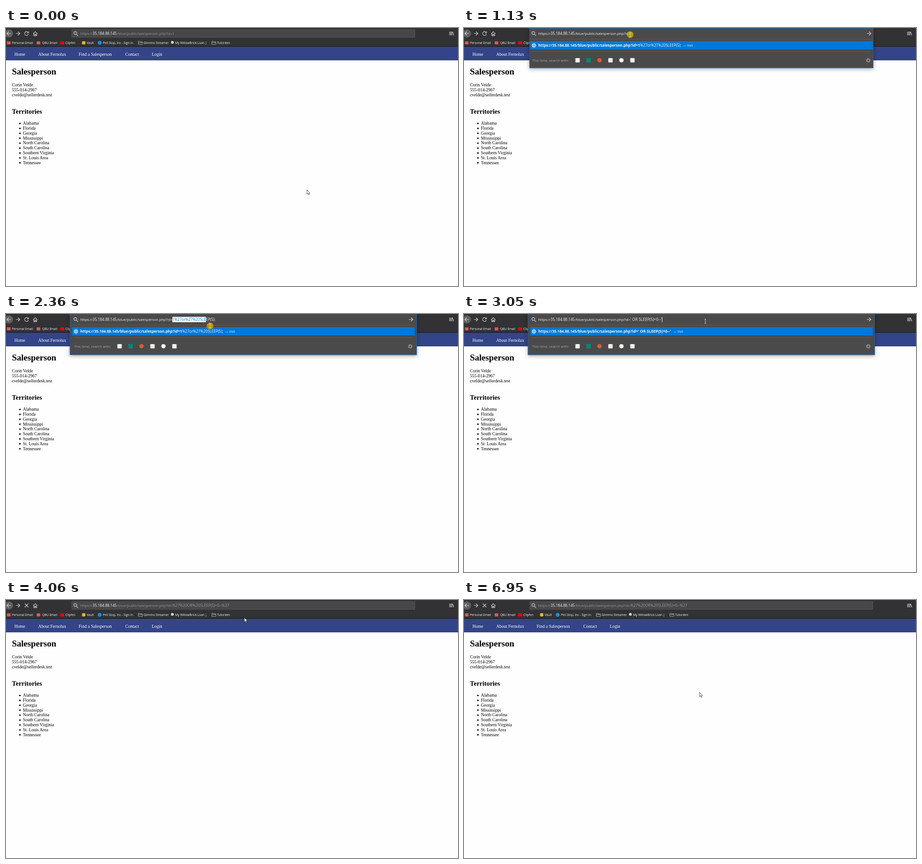
Animation of 989 by 566 pixels, one loop 8.11 s. Source, as an HTML page:

```html
<!DOCTYPE html>
<html lang="en">
<head>
<meta charset="utf-8">
<title>Salesperson</title>
<style>
html, body { margin: 0; height: 100%; overflow: hidden; background: #fefefe; }
svg { display: block; width: 989px; height: 566px; font: 9.6px "Liberation Serif", "Times New Roman", serif; }
text { white-space: pre; }
.ui { font-family: "Open Sans", "Noto Sans", sans-serif; fill: #f4f4f5; }
.line { fill: none; stroke: #d2d2d4; stroke-width: 1.2; }
.thin { fill: none; stroke: #c4c4c6; stroke-width: .8; }
.nav { fill: #fff; }
.b { font-weight: bold; }
#panel { fill: #4a4a4b; stroke: #1d6cb8; stroke-width: .9; filter: drop-shadow(0 2px 4px rgba(0, 0, 0, .35)); }
</style>
</head>
<body>
<svg viewBox="0 0 989 566">
  <defs>
    <g id="globe" class="thin">
      <circle r="4.3"/><ellipse rx="2" ry="4.3"/><path d="M-4.3 0H4.3M-3.7 -2.2H3.7M-3.7 2.2H3.7"/>
    </g>
    <path id="folder" class="thin" d="M.5 7.2V.5H3.8L4.8 1.7H9.3V7.2ZM.5 3H9.3"/>
    <path id="go" class="line" d="M-4.5 0H4M.3 -4L4.3 0L.3 4"/>
  </defs>

  <rect width="989" height="41" fill="#323234"/>
  <rect y="40" width="989" height="1.2" fill="#161618"/>
  <circle cx="6.5" cy="12" r="9" fill="#5f5f61"/>
  <use href="#go" transform="translate(6.3 12) scale(-1 1)"/>
  <use href="#go" x="26" y="12"/>
  <path id="reload" class="line" d="M48 9.2A4.2 4.2 0 1 0 49.1 13M49.2 7.4V10.6H46"/>
  <path id="stop" class="line" d="M41 8L49 16M49 8L41 16"/>
  <path class="line" d="M59.3 12.6L64 8L68.7 12.6M60.9 11.8V16.8H63V13.8H65V16.8H67.1V11.8"/>
  <path class="line" d="M970.8 8V16M973.3 8V16M975.8 8V16M977 8.2L979.8 16"/>
  <rect x="143.9" y="3.4" width="750.8" height="17.2" fill="#474749" stroke="#5c5c5e" stroke-width=".8"/>
  <g id="marks" class="ui" font-size="6.7"></g>

  <rect y="41" width="989" height="30" fill="#334488"/>
  <g id="page"></g>

  <g id="drop">
    <rect id="panel"/>
    <path stroke="#5e5e60" stroke-width=".8" d="M143.5 24.5H895"/>
    <rect x="144.5" y="29" width="750" height="18" fill="#0078d7"/>
    <use href="#globe" x="153" y="38.3" style="filter:brightness(1.3)"/>
    <text class="ui b" font-size="8.1" x="162.5" y="41.2">https://35.184.88.145/blue/public/salesperson.php?id=<tspan id="hit"></tspan></text>
    <text id="visit" class="ui" font-size="6.7" y="41">— Visit</text>
    <g id="second">
      <use href="#globe" x="153" y="60"/>
      <text class="ui" font-size="7.7" x="162.5" y="63" style="fill:#e2e2e4">Salesperson: Corin Velde</text>
      <text class="ui" font-size="6.8" y="62.6" style="fill:#6cb9f4"><tspan x="259.5" fill="#c0c0c2">— </tspan><tspan x="270.5">35.184.88.145/blue/public/salesperson.php?id=</tspan><tspan class="b">' OR SLEEP(5)=0--'</tspan></text>
    </g>
    <g id="engines">
      <path stroke="#5e5e60" stroke-width=".8" d="M149 51.5H890"/>
      <text class="ui" font-size="7.8" x="149" y="74" style="fill:#a4a4a6">This time, search with:</text>
      <g class="thin"><circle cx="884.5" cy="71" r="2.6"/><circle cx="884.5" cy="71" r="4" stroke-width="1.4" stroke-dasharray="1.57"/></g>
    </g>
    <use href="#go" x="886" y="12"/>
  </g>

  <g class="line"><circle cx="151.6" cy="11" r="3.1"/><path d="M153.9 13.4L157.5 17"/></g>
  <rect id="sel" x="364" y="6.3" height="11.7" fill="#fff"/>
  <text id="url" class="ui" y="15.4"><tspan class="dim" x="162.5" font-size="7.9">https://</tspan><tspan x="189.5" font-size="8.1">35.184.88.145</tspan><tspan class="dim" x="243" font-size="7.8">/blue/public/salesperson.php?id=</tspan><tspan id="picked" x="364" fill="#0078d7"></tspan><tspan id="tail" class="dim"></tspan></text>
  <rect id="caret" x="433" y="6.3" width="1" height="11.7" fill="#f4f4f5"/>

  <g id="mouse">
    <circle id="press" r="7.3" fill="#c8b000" opacity=".82"/>
    <path id="beam" fill="none" stroke="#d8d8da" stroke-width=".9" d="M-1.8 -4.6H1.8M0 -4.6V4.6M-1.8 4.6H1.8"/>
    <path id="arrow" fill="#fff" stroke="#222" stroke-width=".8" d="M0 0V9.6L2.2 7.6L3.8 11.1L5.3 10.4L3.7 7.1H6.6Z"/>
  </g>
</svg>
<script>
const LOOP = 8110;
const $ = id => document.getElementById(id);
const add = (id, markup) => $(id).insertAdjacentHTML('beforeend', markup);
const show = (id, on) => $(id).style.display = on ? '' : 'none';
const set = (id, attrs) => { for (const k in attrs) $(id).setAttribute(k, attrs[k]); };
const label = (x, y, s, extra = '') => `<text x="${x}" y="${y}" ${extra}>${s}</text>`;
const box = (x, y, w, h, fill) => `<rect x="${x}" y="${y}" width="${w}" height="${h}" rx="1" fill="${fill}"/>`;
const dot = (x, y, r, fill) => `<circle cx="${x}" cy="${y}" r="${r}" fill="${fill}"/>`;

// Bookmarks
[[13, 'Personal Email'], [79, 'QBU Email'], [130, 'Clipfen'], [176.5, 'Vault'], [212, 'Pell Stop, Inc - Sign In'],
 [301, 'Glimmo Streamer'], [370, 'My WillowBrick Loan |'], [462, 'Tutorden']]
  .forEach(([x, s]) => add('marks', label(x, 35.3, s)));
add('marks', box(2, 29.3, 8, 6.8, '#dd5848') + box(67, 29.3, 8, 6.8, '#dd5848') + box(118.7, 29.5, 8.6, 6.4, '#f00') +
  box(166.5, 29, 7, 7, '#e8b92c') + dot(205, 32.5, 4.2, '#1490df') + dot(364, 31.5, 3, '#d8d8e0') +
  '<use href="#folder" x="289" y="28.7"/><use href="#folder" x="450" y="28.7"/>');

// Page
[[18.5, 'Home'], [70.5, 'About Fernolux'], [159, 'Find a Salesperson'], [261, 'Contact'], [319, 'Login']]
  .forEach(([x, s]) => add('page', label(x, 60.7, s, 'class="nav"')));
add('page', label(13, 102, 'Salesperson', 'class="b" font-size="19.2"') + label(13, 188.2, 'Territories', 'class="b" font-size="14.4"'));
['Corin Velde', '555-014-2967', 'cvelde@sellerdesk.test'].forEach((s, i) => add('page', label(13, 128.4 + 10.8 * i, s)));
['Alabama', 'Florida', 'Georgia', 'Mississippi', 'North Carolina', 'South Carolina', 'Southern Virginia', 'St. Louis Area', 'Tennessee']
  .forEach((s, i) => add('page', dot(30.5, 209.4 + 10.8 * i, 1.7, '#000') + label(37, 212.2 + 10.8 * i, s)));

// Search engines
['#f2f2f2', '#00897b', '#de5833', '#f0ece8', '#f6f6f6', '#f2f2f2'].forEach((c, i) => {
  const x = 248.5 + 24 * i;
  add('engines', i == 2 || i == 4 ? dot(x, 70.7, 4.8, c) : box(x - 4.8, 65.9, 9.6, 9.6, c));
});

// Mouse moves: start, end, steps, path of [progress, x, y]
const moves = [
  [220, 980, 11, [[0, 658.5, 355], [.2, 590, 285], [.45, 390, 95], [.65, 289, 16], [1, 365, 15]]],
  [1130, 1360, 4, [[.25, 363.5, 14.5], [1, 365, 15]]],
  [1670, 1980, 5, [[0, 365, 15], [.5, 410, 20], [1, 368.5, 15]]],
  [2130, 2670, 8, [[.125, 368.5, 15], [.5, 446.5, 26], [.875, 525, 20], [1, 528, 16]]],
  [4060, 4530, 7, [[0, 528, 16], [.5, 505, 95], [1, 480, 167.5]]],
  [6870, 6950, 2, [[0, 480, 167.5], [1, 515.5, 202.5]]],
];

function mouseAt(t) {
  const [from, to, n, path] = moves.filter(m => t >= m[0]).pop() || moves[0];
  const step = t < from ? 0 : Math.floor((t - from) / (to - from) * (n - 1) + 1.02);
  const u = Math.min(1, step / n);
  const i = Math.max(1, path.findIndex(p => p[0] >= u));
  const [a, b] = [path[i - 1], path[i]];
  const k = (u - a[0]) / (b[0] - a[0]);
  return [a[1] + (b[1] - a[1]) * k, a[2] + (b[2] - a[2]) * k];
}

// Query after "id=" with its font size
function queryAt(t) {
  if (t < 1210) return ['1', 8];
  if (t < 3050) return ['1%27or%27%20SLEEP(5);', 8.05];
  if (t < 4060) return ["' OR SLEEP(5)=0--'", 8.5];
  return ['%27%20OR%20SLEEP(5)=0--%27', 8.3];
}

function drawPanel(t, pasted) {
  const grow = Math.min(1, Math.floor((t - 1130) / 76) / 3);
  const extra = t >= 3130 ? 21.4 : 0;
  set('panel', { x: 143.4 - 3.4 * grow, y: .4 - 2.4 * grow, width: 751.8 + 6.8 * grow, height: 87.3 + 4.4 * grow + extra });
  set('engines', { transform: `translate(0 ${extra})` });
  show('second', extra);
  $('hit').textContent = pasted ? "' OR SLEEP(5)=0--'" : '1';
  set('hit', { 'font-size': pasted ? 8.6 : 8.1 });
  if (!pasted) $('hit').insertAdjacentHTML('beforeend', '<tspan font-weight="400">%27or%27%20SLEEP(5);</tspan>');
  set('visit', { x: pasted ? 458.5 : 479.5 });
}

function draw(t) {
  const open = t >= 1130 && t < 4060, pasted = t >= 3050;
  const [x, y] = mouseAt(t);
  show('drop', open);
  if (open) drawPanel(t, pasted);

  const [query, size] = queryAt(t);
  const count = t >= 2130 && !pasted ? Math.min(query.length, Math.round((x - 364) / 5.4)) : 0;
  $('picked').textContent = query.slice(0, count);
  $('tail').textContent = query.slice(count);
  set('picked', { 'font-size': size });
  set('tail', { 'font-size': size });
  $('tail').removeAttribute('x');
  if (!count) set('tail', { x: 364 });
  set('sel', { width: count ? $('picked').getComputedTextLength() : 0 });
  document.querySelectorAll('.dim').forEach(e => e.setAttribute('fill', open ? '#f4f4f5' : '#99999b'));

  show('caret', pasted && open && (t < 3280 || t >= 3760));
  show('reload', t < 4060);
  show('stop', t >= 4060);

  const beam = x > 143 && x < 895 && y < (open ? 28 : 22);
  set('mouse', { transform: `translate(${x} ${y})` });
  show('beam', beam);
  show('arrow', !beam);
  show('press', t >= 1130 && t < 1360 || t >= 2130 && t < 2670);
}

const start = performance.now();
function frame() {
  draw((performance.now() - start) % LOOP);
  requestAnimationFrame(frame);
}
frame();
</script>
</body>
</html>
```
